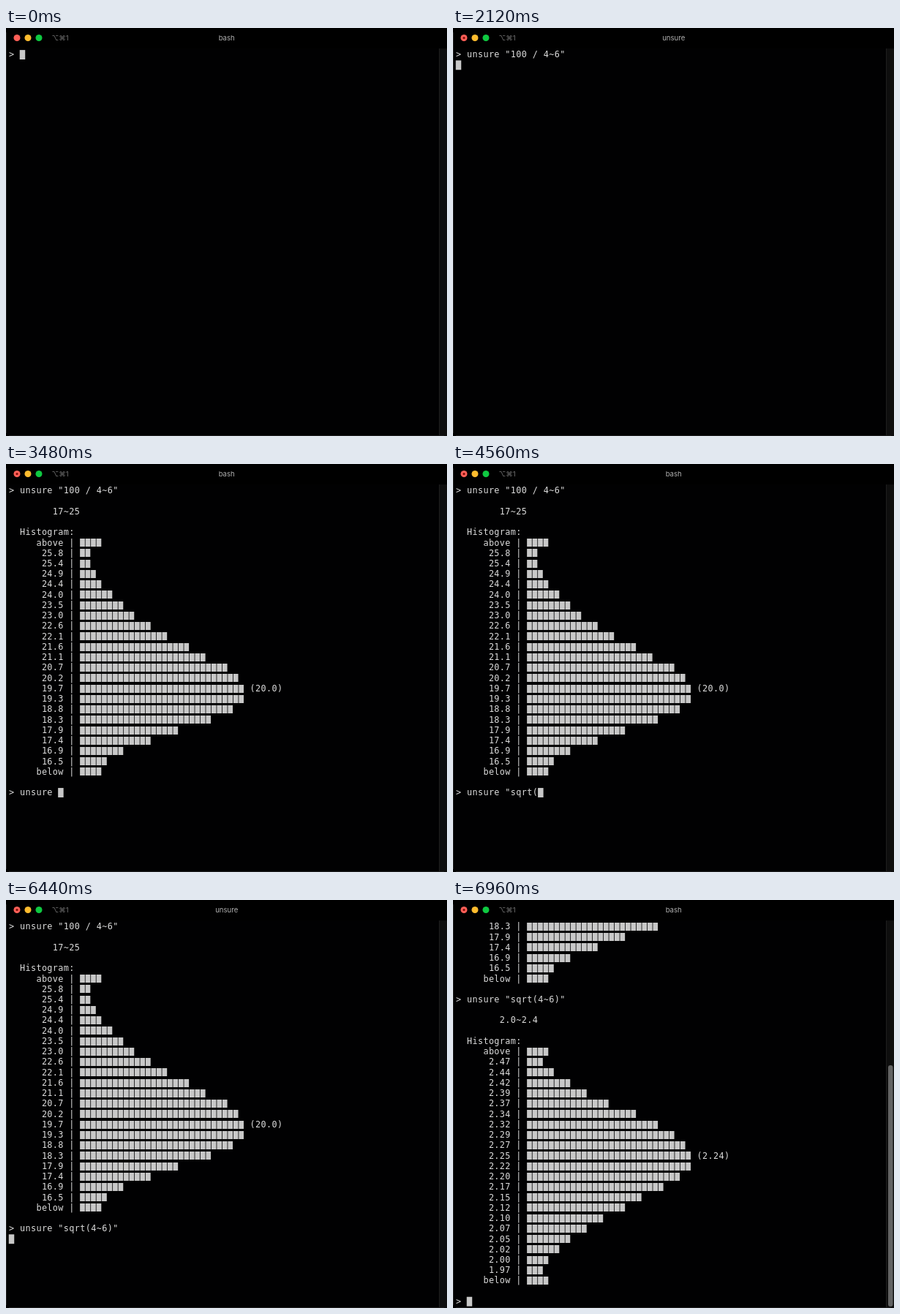
These frames come from a looping animation (603x558 px, 8000 ms). An HTML page with a canvas:

```html
<!DOCTYPE html>
<html lang="en">
<head>
<meta charset="utf-8">
<title>Terminal</title>
<style>
  html, body { margin: 0; width: 100%; height: 100%; overflow: hidden; background: #000; }
  canvas { display: block; }
</style>
</head>
<body>
<canvas id="stage" width="603" height="558"></canvas>
<script>
const LOOP = 8000;
const ROWS = 37, LEFT = 3.75, TOP = 30.1, COL = 7.49, ROW = 14.24;
const BINS = 21, TAIL = 4;
const ctx = document.getElementById('stage').getContext('2d');

// "4~6" is a normal distribution around 5.
const normal = x => Math.exp(-(((x - 5) / 0.51) ** 2) / 2);

// Typing bursts are [first key, last key, text].
const sessions = [
  {
    bursts: [[120, 320, 'unsure '], [720, 920, '"100 '], [1200, 1280, '/ '],
      [1480, 1560, '4~'], [1800, 1920, '6"']],
    enter: 2080, titleOn: 2120, output: 2600, titleOff: 2720,
    range: '17~25', mean: 20, digits: 1,
    top: 25.82, step: 0.4671, shift: -0.04, scale: 29.77,
    density: y => normal(100 / y) * 400 / y ** 2
  },
  {
    bursts: [[3280, 3480, 'unsure '], [3720, 3720, '"'], [4240, 4320, 'sq'],
      [4480, 4560, 'rt('], [4960, 6080, '4~6)'], [6280, 6280, '"']],
    enter: 6400, titleOn: 6440, output: 6920, titleOff: 6960,
    range: '2.0~2.4', mean: Math.sqrt(5), digits: 2,
    top: 2.4685, step: 0.0248, shift: 0.0004, scale: 30.05,
    density: y => normal(y ** 2) * y / Math.sqrt(5)
  }
];

function typed(bursts, t) {
  return bursts.map(([from, to, text]) => {
    if (t < from) return '';
    const progress = to > from ? Math.min(1, (t - from) / (to - from)) : 1;
    return text.slice(0, 1 + Math.floor(progress * (text.length - 1)));
  }).join('');
}

function report({ range, mean, digits, top, step, shift, scale, density }) {
  const bar = (label, n, note = '') => label.padStart(10) + ' | ' + '█'.repeat(n) + note;
  const meanBin = Math.floor((top - mean) / step + 0.6);
  const histogram = Array.from({ length: BINS }, (_, i) => {
    const value = top - i * step;
    const note = i === meanBin ? ` (${mean.toFixed(digits)})` : '';
    return bar(value.toFixed(digits), Math.round(scale * density(value + shift)), note);
  });
  return ['', ' '.repeat(8) + range, '', '  Histogram:',
    bar('above', TAIL), ...histogram, bar('below', TAIL), ''];
}

function screenLines(t) {
  const lines = [];
  for (const s of sessions) {
    lines.push('> ' + typed(s.bursts, t));
    if (t < s.enter) return lines;
    if (t < s.output) return [...lines, ''];
    lines.push(...report(s));
  }
  return [...lines, '> '];
}

function rect(x, y, w, h, color) {
  ctx.fillStyle = color;
  ctx.fillRect(x, y, w, h);
}

function disc(x, y, r, color) {
  ctx.fillStyle = color;
  ctx.beginPath();
  ctx.arc(x, y, r, 0, Math.PI * 2);
  ctx.fill();
}

function drawWindow(t, scrolled) {
  rect(0, 0, 603, 558, '#000');
  rect(0, 28, 603, 530, '#010102');
  rect(592, 28, 11, 530, '#0e0e0e');
  rect(592, 28, 1, 530, '#1e1e1e');
  rect(0, 6, 1, 548, '#1e1e1e');
  rect(4, 557, 595, 1, '#1e1e1e');
  if (scrolled) {
    ctx.fillStyle = '#636363';
    ctx.beginPath();
    ctx.roundRect(595, 226, 6.5, 330, 3.2);
    ctx.fill();
  }

  ['#ff5f57', '#febc2e', '#0fc941'].forEach((color, i) => disc(15 + 15 * i, 13.5, 4.5, color));
  if (t >= sessions[0].enter) disc(15, 13.5, 1.6, '#7a0c08');

  ctx.textAlign = 'left';
  ctx.fillStyle = '#747474';
  ctx.font = '9.5px Inter, "DejaVu Sans", sans-serif';
  ctx.fillText('⌥⌘1', 62.5, 17);
  const running = sessions.some(s => t >= s.titleOn && t < s.titleOff);
  ctx.textAlign = 'center';
  ctx.fillStyle = '#b0b0b0';
  ctx.font = '9.6px Inter, sans-serif';
  ctx.fillText(running ? 'unsure' : 'bash', 301.7, 17);
}

function drawLine(line, y) {
  [...line].forEach((char, i) => {
    const x = LEFT + i * COL;
    if (char === '█') {
      rect(x, Math.round(y + 0.9), 6.7, 11, '#c8c8c8');
    } else {
      ctx.fillStyle = '#dcdcdc';
      ctx.fillText(char, x + COL / 2, y + 10.2);
    }
  });
}

function draw(t) {
  const lines = screenLines(t);
  const first = Math.max(0, lines.length - ROWS);
  const visible = lines.slice(first);
  drawWindow(t, first > 0);

  ctx.font = '11.8px "DejaVu Sans Mono", monospace';
  visible.forEach((line, i) => drawLine(line, TOP + i * ROW));
  rect(LEFT + visible.at(-1).length * COL, TOP + (visible.length - 1) * ROW, COL, 12.9, '#c8c8c8');
}

const start = performance.now();
function tick() {
  draw((performance.now() - start) % LOOP);
  requestAnimationFrame(tick);
}
tick();
</script>
</body>
</html>
```
